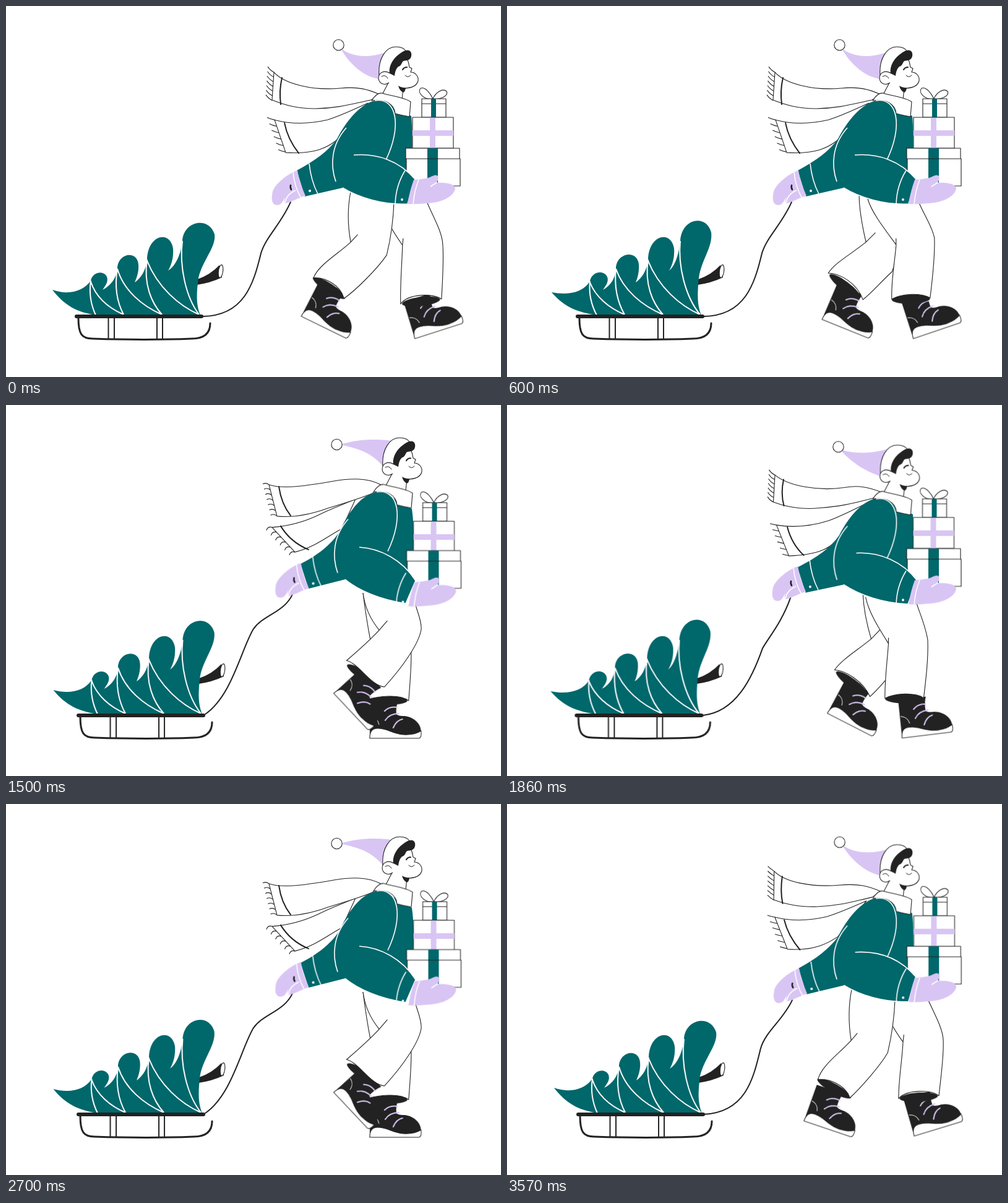
These frames come from a looping animation (800x600 px, 3600 ms). An HTML page without scripts:

```html
<!DOCTYPE html>
<html lang="en">
<head>
<meta charset="utf-8">
<title>Winter walk</title>
<style>
html, body { margin: 0; width: 100%; height: 100%; overflow: hidden; background: #fff }
svg { display: block; width: 800px; height: 600px }
.ink { fill: #fff; stroke: #222; stroke-width: 1.1; stroke-linejoin: round }
.line { fill: none; stroke: #222; stroke-width: 2; stroke-linecap: round }
.seam { fill: none; stroke: #fff; stroke-width: 1.6 }
.teal { fill: #00676b }
.lilac { fill: #d9c5f4 }
.dark { fill: #222 }
.lace { fill: none; stroke: #d9c5f4; stroke-width: 2; stroke-linecap: round }

/* simple swings: cosine between two extremes */
.sled, .tree, .ribs, .head, .chest { animation: .3s cubic-bezier(.37,0,.63,1) infinite alternate }
.sled { animation-name: sled; animation-delay: -.492s }
.tree { animation-name: tree; animation-duration: .6s }
.ribs { animation-name: ribs; animation-duration: .6s }
.head { animation-name: head }
.chest { animation-name: chest }
@keyframes sled { from { transform: translate(-2px,0) } to { transform: translate(5px,0) } }
@keyframes head { to { transform: translate(6px,-13px) } }
@keyframes chest { to { transform: translate(3px,-12.5px) } }
@keyframes tree {
  from { d: path("M75,459C100,468 125,462 137,444C140,430 158,427 163,438C166,446 160,453 156,459C170,452 178,440 180,425C180,400 212,394 214,418C215,430 211,440 208,447C218,440 226,428 228,410C229,370 265,362 270,392C271,405 268,418 262,428C275,420 283,400 285,380C287,347 328,340 337,369C340,390 318,410 311,440C307,470 308,485 314,500L145,500C115,495 95,485 75,459Z") }
  to { d: path("M72,463C98,468 123,464 134,445C137,429 156,426 162,438C165,446 159,453 155,459C168,452 175,440 176,425C176,399 210,393 213,417C214,430 211,440 208,447C218,440 226,428 228,410C229,370 265,362 270,392C271,405 268,418 262,428C272,420 278,400 280,380C282,343 322,336 330,366C333,390 314,410 310,440C307,470 308,485 314,500L145,500C113,495 93,487 72,463Z") }
}
@keyframes ribs {
  from { d: path("M137,444C134,465 138,485 145,500M137,446C145,470 165,488 190,499M180,425C175,455 180,480 190,499M180,425C190,460 220,485 252,499M228,410C222,450 235,480 252,499M228,412C245,455 280,485 312,499M285,380C280,420 290,470 312,499") }
  to { d: path("M134,445C132,465 137,485 145,500M134,447C143,470 164,488 190,499M176,425C173,455 179,480 190,499M176,425C188,460 219,485 252,499M228,410C222,450 235,480 252,499M228,412C245,455 280,485 312,499M280,380C276,420 288,470 312,499") }
}

/* parts that follow the step with a lag */
.hand { animation: hand .6s linear infinite }
.load { animation: load .6s linear infinite }
.stack { animation: stack .6s linear infinite }
.pom { animation: pom .6s linear infinite }
@keyframes hand {
  20% { transform: translate(-2px,-10px) }
  50% { transform: translate(5.5px,-10.5px) }
  70% { transform: translate(7.5px,-.5px) }
}
@keyframes load {
  20% { transform: translate(0,4.5px) }
  50% { transform: translate(1.5px,5.5px) }
  70% { transform: translate(1.5px,1px) }
}
@keyframes stack {
  20% { transform: translate(-1px,-1px) }
  50% { transform: translate(0,2.5px) }
  70% { transform: translate(1px,3.5px) }
}
@keyframes pom {
  20% { transform: translate(-4px,9px) }
  50% { transform: translate(-3px,1px) }
  70% { transform: translate(1px,-8px) }
}

.rope { animation: rope .6s linear infinite }
@keyframes rope {
  0%, to { d: path("M460,317C445,352 420,373 412,400C400,450 385,501 318,502") }
  20% { d: path("M457,305C445,347 430,373 414,387C392,435 355,492 315,502") }
  50% { d: path("M463,306C450,335 415,340 400,362C380,395 365,470 322,500") }
  70% { d: path("M466,318C450,340 405,340 398,375C388,410 395,480 325,501") }
}
.hat { animation: hat .6s linear infinite }
@keyframes hat {
  0%, to { d: path("M540,67C555,82 585,86 616,74L604,118C580,116 555,95 540,67Z") }
  20% { d: path("M535,75C550,74 580,75 613,69L606,113C585,103 555,90 535,75Z") }
  50% { d: path("M541,64C565,56 595,54 624,58L609,99C590,75 565,70 541,64Z") }
  70% { d: path("M546,56C570,64 600,65 627,63L607,104C585,88 565,75 546,56Z") }
}
.tail1 { animation: tail1 .6s linear infinite }
@keyframes tail1 {
  0%, to { d: path("M433,107C450,126 495,137 540,133C570,130 585,135 604,143L590,152C560,158 540,165 500,166C470,166 450,160 430,152Z") }
  20% { d: path("M433,119C460,137 515,142 550,134C570,128 590,133 606,139L592,150C565,158 545,163 510,167C480,173 450,169 431,162Z") }
  50% { d: path("M425,129C450,137 490,130 530,123C560,118 585,118 606,129L592,143C570,152 550,158 520,167C490,178 460,182 438,180Z") }
  70% { d: path("M425,117C440,126 470,125 520,122C560,120 580,120 604,133L590,145C565,152 545,160 510,166C480,171 460,173 437,170Z") }
}
.tail2 { animation: tail2 .6s linear infinite }
@keyframes tail2 {
  0%, to { d: path("M434,184C460,191 490,191 520,184C545,176 560,168 585,157L533,218C520,228 500,240 452,237Z") }
  20% { d: path("M437,204C465,206 490,202 520,190C545,179 560,171 590,154L533,221C520,235 510,244 459,251Z") }
  50% { d: path("M430,198C455,196 480,190 505,178C525,168 540,163 565,152L543,200C520,212 500,230 467,238Z") }
  70% { d: path("M427,178C450,181 480,179 505,172C525,165 540,160 560,155L543,197C520,205 490,226 460,224Z") }
}
.stripes { animation: stripes .6s linear infinite }
@keyframes stripes {
  0%, to { d: path("M446,116Q441,138 444,159M450,189Q455,215 473,238") }
  20% { d: path("M448,125Q443,148 451,167M456,205Q465,234 486,248") }
  50% { d: path("M441,132Q445,160 460,179M444,196Q460,222 489,234") }
  70% { d: path("M439,123Q443,150 453,171M438,180Q450,203 476,224") }
}
.fringe1 { animation: fringe1 .6s linear infinite }
@keyframes fringe1 {
  0%, to { d: path("M433,107q-6,-3 -10,-9m9.5,16.6q-6,-3 -10,-9m9.5,16.6q-6,-3 -10,-9m9.5,16.6q-6,-3 -10,-9m9.5,16.6q-6,-3 -10,-9m9.5,16.6q-6,-3 -10,-9m9.5,16.6q-6,-3 -10,-9") }
  20% { d: path("M433,119q-6,-2 -9,-8m8.7,15q-6,-2 -9,-8m8.7,15q-6,-2 -9,-8m8.7,15q-6,-2 -9,-8m8.7,15q-6,-2 -9,-8m8.7,15q-6,-2 -9,-8m8.7,15q-6,-2 -9,-8") }
  50% { d: path("M425,129q-5,-4 -10,-1m12.1,9.4q-5,-4 -10,-1m12.1,9.4q-5,-4 -10,-1m12.1,9.4q-5,-4 -10,-1m12.1,9.4q-5,-4 -10,-1m12.1,9.4q-5,-4 -10,-1m12.1,9.4q-5,-4 -10,-1") }
  70% { d: path("M425,117q-5,-5 -11,-2m13,10.6q-5,-5 -11,-2m13,10.6q-5,-5 -11,-2m13,10.6q-5,-5 -11,-2m13,10.6q-5,-5 -11,-2m13,10.6q-5,-5 -11,-2m13,10.6q-5,-5 -11,-2") }
}
.fringe2 { animation: fringe2 .6s linear infinite }
@keyframes fringe2 {
  0%, to { d: path("M434,184q-6,-1 -12,-4m15.6,14.4q-6,-1 -12,-4m15.6,14.4q-6,-1 -12,-4m15.6,14.4q-6,-1 -12,-4m15.6,14.4q-6,-1 -12,-4m15.6,14.4q-6,-1 -12,-4") }
  20% { d: path("M437,204q-6,-1 -9,-1m13.4,10.4q-6,-1 -9,-1m13.4,10.4q-6,-1 -9,-1m13.4,10.4q-6,-1 -9,-1m13.4,10.4q-6,-1 -9,-1m13.4,10.4q-6,-1 -9,-1") }
  50% { d: path("M430,198q-7,-2 -9,5m16.4,3q-7,-2 -9,5m16.4,3q-7,-2 -9,5m16.4,3q-7,-2 -9,5m16.4,3q-7,-2 -9,5m16.4,3q-7,-2 -9,5") }
  70% { d: path("M427,178q-7,-2 -12,2m18.6,7q-7,-2 -12,2m18.6,7q-7,-2 -12,2m18.6,7q-7,-2 -12,2m18.6,7q-7,-2 -12,2m18.6,7q-7,-2 -12,2") }
}
.coat { animation: coat .6s linear infinite }
@keyframes coat {
  0%, to { d: path("M590,155C605,150 618,153 625,160L655,178C657,200 656,220 657,250L661,280L649,320C610,322 570,310 544,294L483,308L470,266C500,250 520,235 535,215C545,195 565,165 590,155Z") }
  20% { d: path("M595,149C607,146 618,149 627,160L657,176C657,195 658,220 657,250L664,287L647,324C605,319 570,305 544,287L482,299L469,259C505,242 527,225 539,206C550,185 570,155 595,149Z") }
  50% { d: path("M590,144C600,138 612,138 622,148L656,168C659,190 660,215 658,250L662,284L646,321C605,315 570,300 548,282L489,297L476,257C510,240 530,220 540,203C550,180 570,150 590,144Z") }
  70% { d: path("M585,150C598,142 612,142 620,148L654,170C659,195 658,215 658,250L659,277L648,317C610,318 570,305 548,289L490,306L477,264C505,248 523,230 536,212C545,190 565,160 585,150Z") }
}
.arm { animation: arm .6s linear infinite }
@keyframes arm {
  0%, to { d: path("M562,241C600,238 635,250 661,280L649,320C610,322 570,310 544,294") }
  20% { d: path("M567,238C605,236 645,258 664,287L647,324C605,319 570,305 544,287") }
  50% { d: path("M571,230C605,232 640,250 662,284L646,321C605,315 570,300 548,282") }
  70% { d: path("M566,233C600,234 630,242 659,277L648,317C610,318 570,305 548,289") }
}

/* walk cycle: two steps */
.near { animation: near 1.2s linear infinite }
@keyframes near {
  0%, to { d: path("M557,300C552,325 552,355 557,382L568,370L557,382C538,400 503,420 497,440C513,438 540,450 546,473C565,460 600,425 615,403C622,375 626,345 627,314") }
  25% { d: path("M577,304C580,330 590,348 603,364L616,349L603,364C590,378 570,396 550,413C570,418 588,453 611,456C640,425 668,385 671,362C671,345 664,335 660,316") }
  35% { d: path("M581,310C588,335 605,355 622,374L626,360L622,374C617,400 600,420 597,447C618,444 646,448 658,460C670,430 688,400 690,364C688,350 676,330 662,314") }
  50% { d: path("M583,312C590,335 610,360 629,386L629,376L629,388C626,420 621,445 622,474C640,464 670,464 684,472C688,440 692,405 691,375C687,355 675,340 665,316") }
  75% { d: path("M566,305C563,335 563,360 567,384L568,380L567,384C568,410 569,440 567,476C582,472 617,468 632,480C635,450 638,430 637,403C637,370 640,340 642,314") }
  85% { d: path("M558,296C551,325 551,355 552,384L556,376L552,384C540,415 533,440 532,475C550,470 585,475 597,487C604,455 612,425 616,400C622,370 626,345 628,314") }
}
.far { animation: far 1.2s linear infinite }
@keyframes far {
  0%, to { d: path("M610,316C612,345 625,364 641,387L642,376L641,387C640,420 637,450 638,482C650,465 690,464 704,474C706,440 708,410 706,385C705,365 690,340 680,316") }
  25% { d: path("M577,304C581,335 585,360 589,380L589,379L589,380C590,410 588,440 585,476C600,472 635,466 651,478C653,450 655,430 655,403C655,370 650,340 640,310") }
  35% { d: path("M574,300C573,325 577,355 577,384L580,376L577,384C566,415 558,440 557,475C575,470 610,475 622,487C629,455 637,425 640,400C643,370 645,345 645,314") }
  50% { d: path("M569,306C569,330 575,360 580,382L595,367L580,382C555,402 530,415 519,432C537,432 566,448 575,475C592,462 605,445 622,430C632,405 640,360 640,310") }
  75% { d: path("M600,305C605,335 612,350 622,364L634,349L622,364C605,380 588,395 570,415C590,418 615,445 632,458C660,425 690,380 692,360C690,345 685,330 672,316") }
  85% { d: path("M610,316C612,340 620,355 635,374L638,360L635,374C630,400 612,415 606,447C625,444 655,448 667,460C678,430 697,400 700,364C700,350 692,330 681,314") }
}
.nearCuff { animation: nearCuff 1.2s linear infinite }
@keyframes nearCuff {
  0%, to { transform: translate(522px,456px) rotate(33deg) }
  25% { transform: translate(577px,437px) rotate(33deg) }
  35% { transform: translate(628px,454px) rotate(12deg) }
  50% { transform: translate(653px,474px) rotate(-2deg) }
  75% { transform: translate(600px,478px) rotate(4deg) }
  85% { transform: translate(564px,480px) rotate(10deg) }
}
.farCuff { animation: farCuff 1.2s linear infinite }
@keyframes farCuff {
  0%, to { transform: translate(671px,478px) rotate(-7deg) }
  25% { transform: translate(618px,477px) rotate(2deg) }
  35% { transform: translate(589px,480px) rotate(10deg) }
  50% { transform: translate(546px,453px) rotate(37deg) }
  75% { transform: translate(601px,437px) rotate(33deg) }
  85% { transform: translate(636px,454px) rotate(12deg) }
}
.nearFoot { animation: nearFoot 1.2s linear infinite }
@keyframes nearFoot {
  0%, to { transform: translate(477px,502px) rotate(26deg) }
  25% { transform: translate(529px,466px) rotate(47deg) }
  35% { transform: translate(600px,506px) rotate(13deg) }
  47.5% { transform: translate(654px,537px) rotate(-17deg) }
  50% { transform: translate(657px,538px) rotate(-19deg) }
  58% { transform: translate(628px,539px) rotate(0deg) }
  75% { transform: translate(570px,539px) rotate(0deg) }
  85% { transform: translate(535px,539px) rotate(0deg) }
  97.5% { transform: translate(480px,513px) rotate(18.4deg) }
}
.farFoot { animation: farFoot 1.2s linear infinite }
@keyframes farFoot {
  0%, to { transform: translate(661px,538px) rotate(-18deg) }
  8% { transform: translate(636px,539px) rotate(0deg) }
  25% { transform: translate(588px,539px) rotate(0deg) }
  35% { transform: translate(560px,539px) rotate(0deg) }
  47.5% { transform: translate(513px,515px) rotate(16deg) }
  50% { transform: translate(509px,507px) rotate(22deg) }
  75% { transform: translate(552px,466px) rotate(47deg) }
  85% { transform: translate(607px,506px) rotate(13deg) }
  97.5% { transform: translate(658px,537px) rotate(-17deg) }
}
</style>
</head>
<body>
<svg viewBox="0 0 800 600">
  <defs>
    <g id="boot">
      <path class="dark" d="M1,-62L46,-62Q42,-50 43,-39Q46,-36 54,-36C68,-36 82,-26 83,-12L80,-4L0,-2Z"/>
      <path class="ink" d="M0,0Q0,-16 12,-16C28,-17 36,-7 54,-6Q72,-5 83,-12Q84,-1 80,0Z"/>
      <path class="seam" style="stroke-width:1" d="M2,-35Q13,-33 15,-22"/>
      <path class="lace" d="M24,-44Q32,-52 44,-50M25,-29Q32,-40 47,-40M38,-17Q43,-29 53,-31"/>
    </g>
    <ellipse id="cuff" class="dark" rx="31" ry="7.5"/>
  </defs>

  <g class="sled">
    <path class="dark" d="M309,442Q330,435 345,419L349,439Q330,448 308,451Z"/>
    <ellipse class="ink" cx="347" cy="429" rx="3.6" ry="10.5" transform="rotate(8 347 429)"/>
    <path class="teal tree"/>
    <path class="seam ribs" style="stroke-width:2"/>
    <path class="line" style="stroke-width:3" d="M117,505C117,530 122,538 140,538C200,540 250,540 300,538C320,538 330,530 330,513"/>
    <path class="line" d="M165.500,505V538M175,505V538M244,505V538M253,505V538"/>
    <path class="line" style="stroke-width:6" d="M114,502H316"/>
  </g>
  <path class="line rope"/>

  <g class="farFoot"><use href="#boot"/></g>
  <g class="farCuff"><use href="#cuff"/></g>
  <path class="ink far"/>
  <g class="nearFoot"><use href="#boot"/></g>
  <g class="nearCuff"><use href="#cuff"/></g>
  <path class="ink near"/>

  <path class="ink fringe1" style="fill:none"/>
  <path class="ink fringe2" style="fill:none"/>
  <path class="ink tail2"/>
  <path class="ink tail1"/>
  <path class="line stripes"/>

  <path class="teal coat"/>
  <g class="hand">
    <path class="lilac" d="M471,266C455,271 435,288 431,300C427,318 433,322 438,322C446,322 448,314 451,309Q448,318 452,319C460,318 470,311 484,307Q474,285 471,266Z"/>
    <path class="seam" d="M464,269Q466,292 477,311M490,255Q493,283 504,304M468,298Q453,305 451,318"/>
    <path class="line" style="stroke-width:2.500" d="M460,290Q459,294 461,297"/>
    <circle cx="491" cy="299" r="2" fill="#fff"/>
  </g>

  <path class="lilac hat"/>
  <circle class="ink pom" cx="537.500" cy="63" r="8.700"/>
  <g class="head">
    <path class="ink" d="M617,126L606,147L640,151L642,133C655,133 664,129 666,121C667,113 661,107 654,107L656,101L652,99Q651,92 648,84L622,90Z"/>
    <path class="dark" d="M634,129Q640,133 646,132Q646,137 642,140Q636,137 634,129Z"/>
    <path class="ink" d="M603,112C601,85 614,66 630,66C640,66 645,70 647,74C630,79 622,92 620,110Z"/>
    <path class="dark" d="M620,109C618,95 628,80 645,72C655,69 657,78 654,84C651,89 645,88 642,89C639,92 639,97 634,98C630,102 629,106 628,113Z"/>
    <path class="ink" d="M621,109C612,103 602,107 602,117C603,126 612,129 619,124"/>
    <path class="line" style="stroke-width:1" d="M607,114Q613,110 617,117M645,112Q649,117 654,112"/>
    <path class="line" d="M641,103Q643,99 648,99"/>
  </g>
  <g class="chest">
    <path class="ink" d="M591,153C597,143 602,140 608,141C625,146 645,148 654,155Q653,168 652,179Q640,177 629,174C628,158 612,150 591,153Z"/>
    <path class="seam" d="M596,153C632,147 640,195 614,249M550,197C525,225 524,258 533,284"/>
  </g>

  <g class="load">
    <g class="stack">
      <path class="ink" d="M690,150C675,152 664,140 670,133C678,130 686,142 690,150C694,140 706,132 712,138C716,146 700,152 690,150Z"/>
      <path class="ink" d="M672,150H711V180H672ZM672,158H711"/>
      <path class="teal" d="M687,150H695V180H687Z"/>
      <path class="ink" d="M657,180H723V230H657Z"/>
      <path class="lilac" d="M685,181H694V230H685ZM657,201H723V210H657Z"/>
    </g>
    <path class="ink" d="M647,247H734V291H647ZM646,230H733V247H646Z"/>
    <path class="teal" d="M681,230H698V286H681Z"/>
    <path class="line" style="stroke-width:1" d="M681,247H698"/>
  </g>
  <path class="seam arm" style="fill:#00676b"/>
  <g class="load">
    <path class="lilac" d="M659,281Q675,280 685,277Q695,271 698,275Q700,281 695,286C710,285 725,287 726,295C724,308 705,318 680,319Q664,321 649,320Q652,300 659,281Z"/>
    <path class="seam" d="M667,281Q660,298 658,320M645,266Q630,290 629,320M697,285Q692,288 686,292"/>
    <circle cx="640" cy="313" r="2" fill="#fff"/>
  </g>
</svg>
</body>
</html>
```
